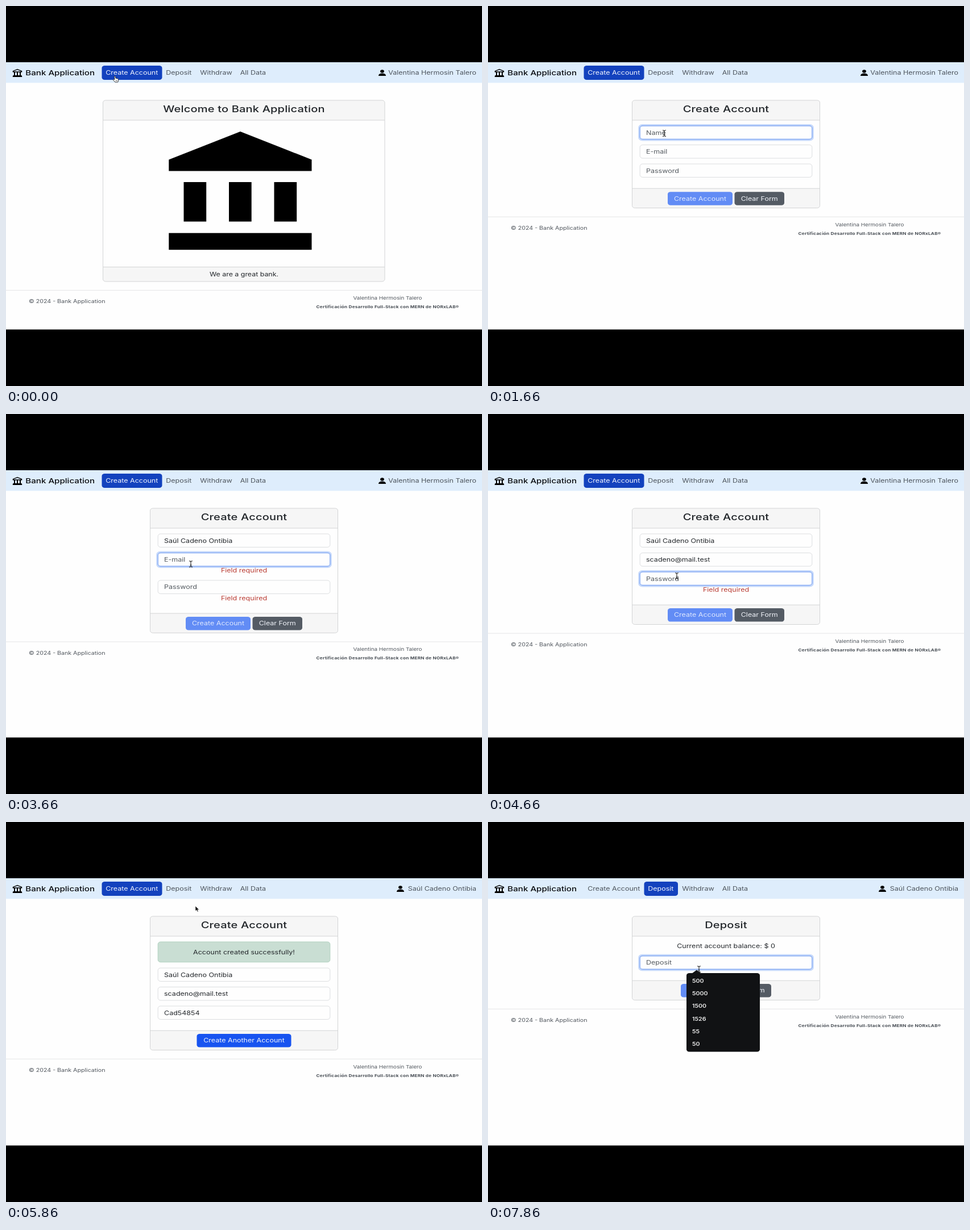
Write an HTML page that moves like this. It is 837 by 669 pixels and loops after 8 s.

```html
<!DOCTYPE html>
<html lang="en">
<head>
<meta charset="utf-8">
<title>Bank Application</title>
<style>
  html, body { margin: 0; width: 100%; height: 100%; overflow: hidden; background: #000; }
  svg { display: block; width: 100vw; height: 100vh; }
  text { font-family: Inter, Roboto, "Open Sans", sans-serif; white-space: pre; }
</style>
</head>
<body>
<svg id="stage" viewBox="0 0 837 669" preserveAspectRatio="none"></svg>
<script>
const LOOP = 8000;
const STRETCH = 1.24;
const OWNER = 'Valentina Hermosin Talero';
const CLIENT = 'Saúl Cadeno Ontibia';
const EMAIL = 'scadeno@mail.test';
const PASSWORD = 'Cad54854';
const CENTER = 418.5;
const INK = '#212529', GREY = '#4c535b', NAV_BLUE = '#1342be', BLUE = '#1854f0',
      PALE_BLUE = '#628cf5', SLATE = '#545b64';

const ticks = [0, ...[
  [60, 1060, 6], [1260, 2260, 6], [2460, 3460, 9], [3530, 4460, 14],
  [4660, 5660, 6], [5860, 6860, 6], [7260, 7860, 4]
].flatMap(([a, b, n]) =>
  Array.from({ length: n }, (_, i) => Math.round(a + (b - a) * i / (n - 1))))];

const pointer = [
  [0, 193, 129, 'hand'], [860, 195, 127, 'hand'], [1060, 200, 128, 'hand'],
  [1260, 242, 168, 'arrow'], [1460, 300, 216, 'beam'], [1660, 310, 224, 'beam'],
  [1800, 310, 224, ''], [3530, 321, 246, 'beam'], [3600, 325, 264, 'beam'],
  [3700, 325, 264, ''], [4460, 328, 272, 'beam'], [4660, 332, 285, 'beam'],
  [4800, 332, 285, ''], [5460, 356, 318, 'arrow'], [5660, 372, 341, 'hand'],
  [5860, 333, 148, 'arrow'], [6060, 322, 138, 'arrow'], [6260, 310, 127, 'hand'],
  [6860, 304, 125, 'hand'], [7260, 304, 125, 'hand'], [7460, 332, 165, 'arrow'],
  [7660, 364, 236, 'beam'], [7860, 371, 259, 'beam'], [8000, 371, 259, 'beam']
];

function segment(keys, t) {
  let i = 0;
  while (i < keys.length - 2 && t >= keys[i + 1][0]) i++;
  const a = keys[i], b = keys[i + 1];
  const k = Math.min(1, Math.max(0, (t - a[0]) / (b[0] - a[0])));
  return { a, b, k, at: c => a[c] + (b[c] - a[c]) * k };
}
const typed = (word, keys, t) => word.slice(0, Math.round(segment(keys, t).at(1)));

// y is the middle of the capitals
function text(str, x, y, { size = 10.1, fill = INK, weight = 400, anchor = 'start', spacing = 0 } = {}) {
  return `<text transform="translate(${x} ${y + size * .364}) scale(${STRETCH} 1)" font-size="${size}"
    font-weight="${weight}" fill="${fill}" text-anchor="${anchor}" letter-spacing="${spacing}">${str}</text>`;
}
const centered = (str, x, y, style) => text(str, x, y, { anchor: 'middle', ...style });
const rect = (x, y, w, h, fill, r = 0, stroke = 'none', line = 1) =>
  `<rect x="${x}" y="${y}" width="${w}" height="${h}" rx="${r * STRETCH}" ry="${r}" fill="${fill}"
    stroke="${stroke}" stroke-width="${line}"/>`;
const path = (d, fill = '#000', stroke = 'none', line = 1) =>
  `<path d="${d}" fill="${fill}" stroke="${stroke}" stroke-width="${line}" stroke-linejoin="round"/>`;

function navbar(active, user) {
  const items = [['Create Account', 168.5, 106], ['Deposit', 274.5, 59.5],
                 ['Withdraw', 334.5, 70], ['All Data', 405, 60]];
  const links = items.map(([label, x, w]) => {
    const on = label === active;
    return (on ? rect(x, 105, w, 25, NAV_BLUE, 4) : '') +
      text(label, x + 6.7, 117.5, { fill: on ? '#f4f7ff' : GREY });
  }).join('');
  const x = user === OWNER ? 661.5 : 693.5;
  return rect(0, 99, 837, 36.3, '#deedfc') +
    path('M12.5 116V114.6L20 111.6L27.5 114.6V116Z', 'none', '#000', 1.5) +
    path('M15 116V122.5M20 116V122.5M25 116V122.5', 'none', '#000', 2) +
    path('M12.4 122H27.6V123.2H28.2V125H11.8V123.2H12.4Z') +
    text('Bank Application', 34.3, 117.5, { size: 12.2, weight: 500, fill: '#0b0d10' }) + links +
    `<ellipse cx="${x}" cy="115" rx="3.4" ry="2.7"/>` +
    path(`M${x - 6.5} 123Q${x - 6.5} 118.6 ${x} 118.5Q${x + 6.5} 118.6 ${x + 6.5} 123Z`) +
    text(user, 827, 117, { anchor: 'end', fill: GREY });
}

function card(title, x, w, footTop, bottom) {
  const line = '#d3d4d5';
  return rect(x, 166, w, bottom - 166, '#f6f6f6', 4) +
    rect(x, 201, w, footTop - 201, '#fefefe') +
    path(`M${x} 201H${x + w}M${x} ${footTop}H${x + w}`, 'none', line) +
    rect(x, 166, w, bottom - 166, 'none', 4, line) +
    centered(title, CENTER, 181.3, { size: 16.2, weight: 500, spacing: .12 });
}
const formCard = (title, footTop) => card(title, 253.5, 330, footTop, footTop + 34.4);

function pageFooter(bottom) {
  return path(`M0 ${bottom + 15.6}H837`, 'none', '#e4e5e6') +
    text('© 2024 - Bank Application', 40, bottom + 35.2, { size: 8.6, fill: '#50565d' }) +
    centered(OWNER, 671, bottom + 29.2, { size: 7.9, fill: '#50565d' }) +
    centered('Certificación Desarrollo Full-Stack con MERN de NORxLAB®', 671, bottom + 44.6,
      { size: 6.6, weight: 700, fill: '#454b52', spacing: .18 });
}

function input(y, placeholder, value, focused) {
  const ring = focused ? rect(265.7, y - 1.5, 305.6, 26.5, 'none', 4.5, '#c6d9fb', 3) : '';
  const caret = focused && value ? '<tspan dx="-1.2" font-weight="300">|</tspan>' : '';
  return ring + rect(267.2, y, 302.6, 23.5, '#fefefe', 4, focused ? '#86abf3' : '#dcdee0', focused ? 1.4 : 1) +
    text((value || placeholder) + caret, 278, y + 11.9, { fill: value ? INK : '#53595f' });
}

const button = (label, x, w, y, fill) =>
  rect(x, y, w, 23.5, fill, 4) +
  centered(label, x + w / 2, y + 11.7, { fill: fill === PALE_BLUE ? '#e0e9fe' : '#f3f6fc' });

function welcome() {
  const columns = [312.5, 392, 471.5].map(x => rect(x, 310, 39.7, 69.5, '#000')).join('');
  return card('Welcome to Bank Application', 170.5, 495.5, 459.5, 485) +
    path('M286.3 270.5L412 221L537.5 270.5V290.5H286.3Z') + columns +
    rect(286.3, 399.7, 251.2, 29.5, '#000') +
    centered('We are a great bank.', CENTER, 472, { size: 10 }) + pageFooter(485);
}

function createForm(t) {
  const fields = [
    ['Name', typed(CLIENT, [[1660, 0], [2260, 3], [3335, 19]], t), 1660, 3600],
    ['E-mail', typed(EMAIL, [[3680, 0], [4440, 17]], t), 3600, 4560],
    ['Password', typed(PASSWORD, [[4660, 0], [5260, 8]], t), 4560, 5460]
  ];
  const touched = fields[0][1] !== '';
  let y = 211, body = '';
  for (const [label, value, from, to] of fields) {
    body += input(y, label, value, t >= from && t < to);
    if (touched && !value) {
      body += centered('Field required', CENTER, y + 31.2, { fill: '#b93a31' });
      y += 14.9;
    }
    y += 33.5;
  }
  const foot = y + 9.7, ready = fields.every(f => f[1]);
  return formCard('Create Account', foot) + body +
    button('Create Account', 316, 114, foot + 6, ready ? BLUE : PALE_BLUE) +
    button('Clear Form', 433.5, 87.5, foot + 6, SLATE) + pageFooter(foot + 34.4);
}

function success() {
  return formCard('Create Account', 367.2) +
    rect(267.2, 211, 302.6, 35.7, '#c9ded3', 4, '#b0d1bf') +
    centered('Account created successfully!', CENTER, 229) +
    input(257, '', CLIENT) + input(290.5, '', EMAIL) + input(324, '', PASSWORD) +
    button('Create Another Account', 335.5, 166, 373, BLUE) + pageFooter(401.6);
}

function deposit(open) {
  const list = ['500', '5000', '1500', '1526', '55', '50'].map((n, i) =>
    text(n, 359, 279.5 + i * 22.3, { size: 8.6, weight: 600, fill: '#f1f1f1' })).join('');
  return formCard('Deposit', 279.2) +
    centered('Current account balance: $ 0', CENTER, 218.5) +
    input(235.7, 'Deposit', '', open) +
    button('Deposit', 339, 68, 285, PALE_BLUE) + button('Clear Form', 410.5, 87.5, 285, SLATE) +
    pageFooter(313.6) +
    (open ? path('M358 267L367 260.5L375 267Z', '#111214') + rect(349, 266, 129, 138.5, '#111214', 4) + list : '');
}

const cursors = {
  hand: path('M-2.6 -5.5Q-1.3 -6.3 -.8 -4.8L0 -1.8Q3.8 -1.8 4.6 0Q5.2 3 3.6 5H-1.2Q-3 3 -4.8 .8Q-4 -.6 -2 .6Z', '#fff', '#222', .9) +
    path('M.4 1V3.4M2.2 1V3.4', 'none', '#222', .6),
  arrow: path('M0 0V8.6L2.1 6.9L3.7 10L5.2 9.4L3.7 6.4H6.6Z', '#111', '#fff', .5),
  beam: path('M-3 -5.2Q0 -5.2 0 -3.6Q0 -5.2 3 -5.2M0 -3.6V4M-3 5.4Q0 5.4 0 3.8Q0 5.4 3 5.4M-1.5 2H1.5', 'none', '#222', 1.1)
};
function drawPointer(t) {
  const s = segment(pointer, t), kind = t >= s.b[0] ? s.b[3] : s.a[3];
  return kind ? `<g transform="translate(${s.at(1)} ${s.at(2)})">${cursors[kind]}</g>` : '';
}

function scene(t) {
  const page = t < 460 ? welcome() : t < 5860 ? createForm(t) : t < 7260 ? success() : deposit(t >= 7860);
  const active = t < 6260 ? 'Create Account' : 'Deposit';
  return rect(0, 0, 837, 669, '#000') + rect(0, 99, 837, 470.5, '#fefefe') +
    navbar(active, t < 5860 ? OWNER : CLIENT) + page + drawPointer(t);
}

const stage = document.getElementById('stage');
const start = performance.now();
let shown = -1;
function frame() {
  const now = (performance.now() - start) % LOOP;
  const t = ticks.filter(tick => tick <= now).pop();
  if (t !== shown) stage.innerHTML = scene(shown = t);
  requestAnimationFrame(frame);
}
frame();
</script>
</body>
</html>
```
